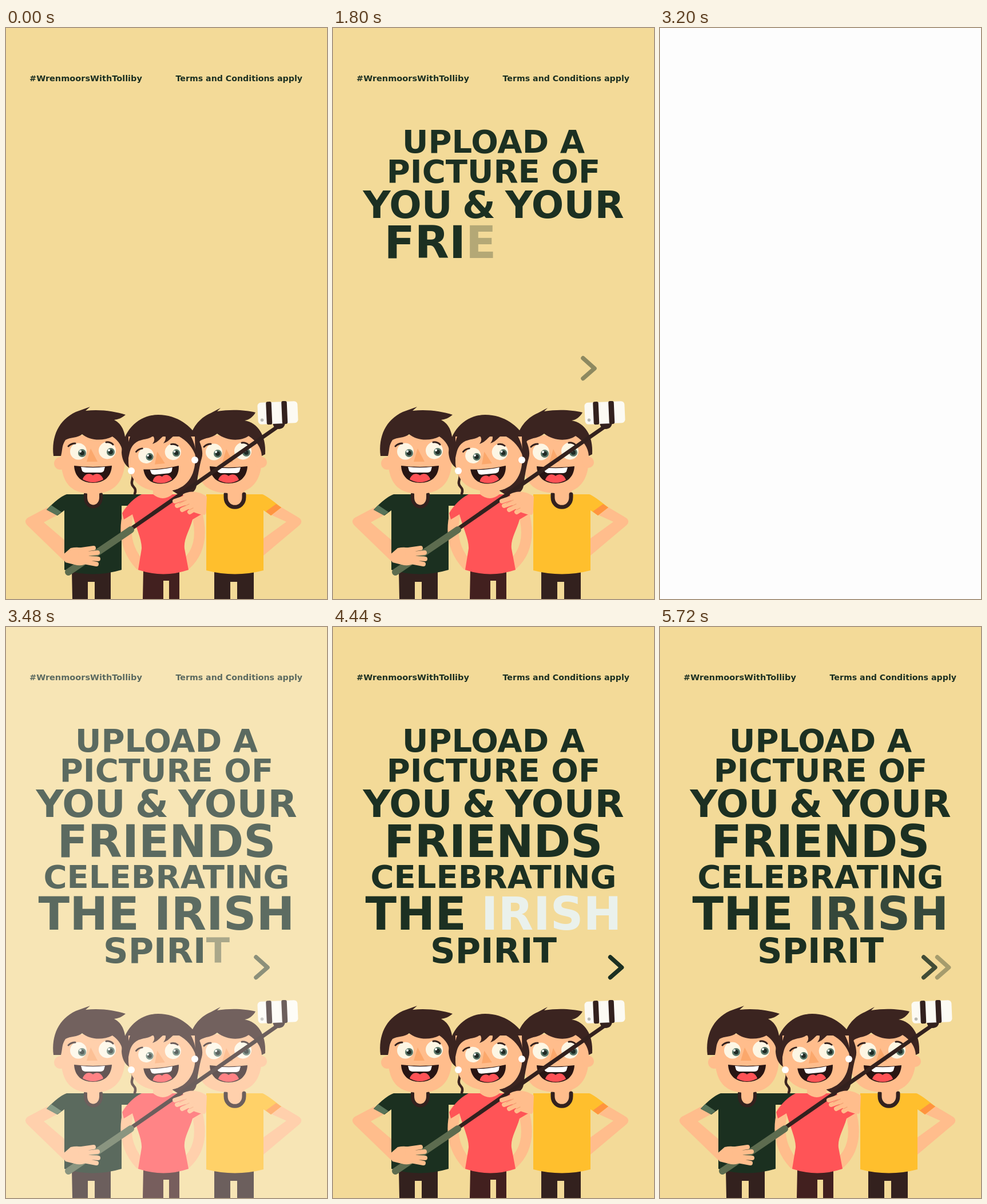
An HTML page for the animation above (5.76 s loop, 561 by 998 pixels).

```html
<!DOCTYPE html>
<html lang="en">
<head>
<meta charset="utf-8">
<title>Upload a picture</title>
<style>
  html, body { margin: 0; width: 100%; height: 100%; overflow: hidden; background: #f3da98; }
  svg { display: block; width: 561px; height: 998px; }
  text { font-family: "DejaVu Sans", Verdana, sans-serif; font-weight: 700; fill: #1c3022; white-space: pre; }
  .small { font-size: 14.2px; }
  .skin { fill: #ffbd8c; }
  .hair { fill: #3b2420; }
  .dark { fill: #33211e; }
  .line { fill: none; stroke-linecap: round; stroke-linejoin: round; }
</style>
</head>
<body>
<svg viewBox="0 0 561 998">
  <defs>
    <g id="face">
      <path d="M148 735L141 758H160Z" fill="#fba86c"/>
      <g fill="#fdf6e4"><circle cx="126.500" cy="740" r="14.500"/><circle cx="177" cy="738.500" r="15"/></g>
      <g fill="#587466"><circle cx="133" cy="743" r="7"/><circle cx="183" cy="741" r="7"/></g>
      <g fill="#1f2a25"><circle cx="133" cy="743" r="4"/><circle cx="183" cy="741" r="4"/></g>
      <g fill="#fff"><circle cx="130" cy="740" r="2"/><circle cx="180" cy="738" r="2"/></g>
      <path class="line" d="M109 731Q114 726 121 726M175 724Q182 723 187 728" stroke="#33211e" stroke-width="3"/>
      <path d="M119 765Q152 769 185 765C184 784 172 795 152 795C132 795 120 784 119 765Z" fill="#281513"/>
      <path d="M131 767Q152 769.500 173 767L171 774Q169 777 165 777H138Q134 776 133 774Z" fill="#fff"/>
      <path d="M134 789C137 779 146 777 152 782C158 777 167 779 170 789Q152 799 134 789Z" fill="#ff5256"/>
    </g>
    <path id="chevron" class="line" d="M437 577L457 595L437 612.500" stroke="#1c3022" stroke-width="7.500"/>
  </defs>

  <rect width="561" height="998" fill="#f3da98"/>
  <text class="small" style="font-size:14.5px" x="41" y="93">#WrenmoorsWithTolliby</text>
  <text class="small" x="296.500" y="93">Terms and Conditions apply</text>
  <g id="headline" text-anchor="middle"></g>
  <g id="arrows"></g>

  <!-- trousers -->
  <path class="dark" d="M115 948H183V998H155V968H143V998H116ZM364 948H433V998H404V968H392V998H364Z"/>
  <path d="M240 948H303V998H285V966H275V998H239Z" fill="#42201f"/>

  <!-- friend on the right -->
  <path class="skin" d="M480 837L512 856Q520 862 513 869L450 922V892L490 863L461 850Z"/>
  <path d="M350 815H448Q455 817 481 838L463 852L450 843V948Q400 961 350 948Z" fill="#ffbf2d"/>
  <path d="M472 832L481 838L463 852L454 845Z" fill="#ff9440"/>
  <path class="skin" d="M384 800H417V822Q414 836 400 836Q386 836 384 822Z"/>
  <path class="line" d="M384 815V820C384 843 416 843 416 820V815" stroke="#33211e" stroke-width="7" stroke-linecap="butt"/>
  <path class="skin" d="M332 712H447V757C445 797 425 813 392 813C352 813 334 797 332 757Z"/>
  <circle class="skin" cx="446" cy="759" r="10"/>
  <use href="#face" x="237" y="1"/>
  <path class="hair" d="M320 722C324 700 337 682 358 673L375 664L369 670C395 666 420 668 436 672C431 681 424 685 417 686C440 690 455 712 453 745L447 748C446 733 438 722 424 713C410 723 386 722 369 709C360 717 348 716 340 721L330 732Z"/>

  <!-- friend on the left -->
  <path class="skin" d="M72 838L38 856Q30 862 38 870L104 934L122 912L66 864L92 850Z"/>
  <path d="M106 815H240V835H202V947Q152 962 102 947V843L90 852L71 842Q92 820 106 815Z" fill="#1b3020"/>
  <path d="M79 834L97 846L89 852L71 842Z" fill="#587459"/>
  <path class="skin" d="M137 800H168V820Q166 836 152 836Q138 836 137 820Z"/>
  <path class="line" d="M139 815V820C139 842 166 842 166 820V815" stroke="#33211e" stroke-width="6" stroke-linecap="butt"/>
  <circle class="skin" cx="95" cy="761" r="11"/>
  <path class="skin" d="M96 712H208V757C206 797 186 814 151 814C115 814 98 797 96 757Z"/>
  <use href="#face"/>
  <path class="hair" d="M83 748C79 714 92 685 122 671L147 662L139 669C165 666 190 670 209 676C202 682 196 684 189 685C203 692 212 708 208 742L204 746C204 731 197 722 186 714C170 722 148 722 133 710C125 717 112 715 104 720C97 730 99 738 96 748Z"/>

  <!-- friend in the middle -->
  <path class="hair" d="M202 742C204 700 235 676 266 676C300 676 325 697 334 715C342 728 345 742 342 752C338 765 334 790 333 800Q330 818 302 816L230 770C214 775 203 760 202 742Z"/>
  <path class="line" d="M218 776C228 785 214 793 223 802Q228 807 225 814" stroke="#3b2420" stroke-width="4.500"/>
  <path class="line" d="M214 846C204 885 213 915 234 938M333 846C345 890 336 918 314 938" stroke="#ffbd8c" stroke-width="19"/>
  <path d="M237 815H306L332 818Q342 832 343 849L326 859C321 878 310 893 312 910L319 947Q275 962 231 947L237 910C238 895 227 873 221 850L206 859L203 848Q217 825 237 815Z" fill="#ff5457"/>
  <path class="skin" d="M257 800H291V815Q274 829 257 815Z"/>
  <path class="skin" d="M214 714H330L331 752C330 790 310 810 274 810C237 810 216 792 214 760Z"/>
  <use href="#face" transform="translate(268 744) rotate(-6) scale(.94) translate(-151.500 -739)"/>
  <path class="hair" d="M213 756C208 716 224 684 266 682C306 682 333 712 332 750C327 733 316 721 301 713C292 708 289 721 275 726Q281 718 278 712C270 715 268 723 256 727Q262 720 257 713C247 721 234 717 224 727C216 735 216 744 213 756Z"/>
  <g fill="#fff"><circle cx="219" cy="774" r="6"/><circle cx="330" cy="755" r="6"/></g>

  <!-- selfie stick, phone and hands -->
  <path class="line" d="M219 875L476 696" stroke="#33211e" stroke-width="7"/>
  <path class="line" d="M109 951L218 877" stroke="#5d6c4f" stroke-width="12"/>
  <path class="dark" d="M466 689L488 688Q488 700 477 701Q467 701 466 689Z"/>
  <g transform="rotate(-2.500 475 672.500)">
    <rect x="440" y="653.500" width="70" height="38" rx="6" fill="#fcfaf3"/>
    <rect class="dark" x="455" y="652.500" width="9.500" height="40" rx="3"/>
    <rect class="dark" x="482" y="652.500" width="9.500" height="40" rx="3"/>
    <circle cx="447" cy="684" r="2.800" fill="#b9b8b2"/>
  </g>
  <path class="skin" d="M97 923L113 909Q133 905 145 915L144 934Q133 942 120 938L104 934Z"/>
  <path class="line" d="M118 914L153 909M130 920L160 917M132 926L161 928M126 931L158 937" stroke="#ffbd8c" stroke-width="8"/>
  <path class="skin" d="M351 819C337 809 321 808 309 815L315 838Q330 850 347 851Q350 850 350 842Z"/>
  <path class="line" d="M322 818L295 827M324 826L299 835M326 833L308 842M334 838L321 846" stroke="#ffbd8c" stroke-width="8"/>
  <path class="line" d="M315 825L303 831M320 832L310 837M327 839L321 842" stroke="#f2a070" stroke-width="1.200"/>

  <rect id="flash" width="561" height="998" fill="#fdfdfd" opacity="0"/>
</svg>
<script>
const LOOP = 5760, STEP = 40;
const CHAR_GAP = 57.5, CHAR_FADE = 60;
const ARROW_LOOP = 1600;

// text, font size, baseline, extra word spacing
const LINES = [
  ["UPLOAD A", 56, 218, 0],
  ["PICTURE OF", 56, 270, 0],
  ["YOU & YOUR", 66.5, 332, -6],
  ["FRIENDS", 78, 402, 0],
  ["CELEBRATING", 56, 456, 0],
  ["THE IRISH", 80, 529, -2],
  ["SPIRIT", 60.5, 587, 0]
];
// start of rise, full, start of fall, gone
const ARROWS = [
  [20, 400, 430, 820],
  [400, 780, 860, 1200],
  [770, 1180, 1270, 1560]
];
const FLASH = [3030, 3130, 3220, 3580];
const DARK = [28, 48, 34], LIGHT = [234, 241, 236];

const make = (tag, attrs, parent) => {
  const el = document.createElementNS("http://www.w3.org/2000/svg", tag);
  for (const key in attrs) el.setAttribute(key, attrs[key]);
  return parent.appendChild(el);
};
const clamp = v => Math.max(0, Math.min(1, v));
const pulse = (t, [a, b, c, d]) => Math.min(clamp((t - a) / (b - a)), clamp((d - t) / (d - c)));

const headline = document.getElementById("headline");
const flash = document.getElementById("flash");
const letters = [], irish = [];
for (const [text, size, y, gap] of LINES) {
  const line = make("text", { x: 280.5, y, "font-size": size, "word-spacing": gap }, headline);
  [...text].forEach((ch, i) => {
    const span = make("tspan", {}, line);
    span.textContent = ch;
    letters.push(span);
    if (text === "THE IRISH" && i > 3) irish.push(span);
  });
}
const arrows = ARROWS.map((_, i) =>
  make("use", { href: "#chevron", x: i * 23.8 }, document.getElementById("arrows")));

function draw(t) {
  letters.forEach((el, i) => el.style.fillOpacity = clamp((t - i * CHAR_GAP) / CHAR_FADE));
  const glow = t < 3400 ? 0 : (1 - Math.cos((t - 3400) / 1040 * Math.PI)) / 2;
  const tint = `rgb(${DARK.map((v, i) => Math.round(v + (LIGHT[i] - v) * glow))})`;
  irish.forEach(el => el.style.fill = tint);
  arrows.forEach((el, i) => el.style.opacity = pulse(t % ARROW_LOOP, ARROWS[i]));
  flash.style.opacity = pulse(t, FLASH);
}

const start = performance.now();
function tick() {
  const t = (performance.now() - start) % LOOP;
  draw(Math.floor(t / STEP) * STEP);
  requestAnimationFrame(tick);
}
draw(0);
requestAnimationFrame(tick);
</script>
</body>
</html>
```
